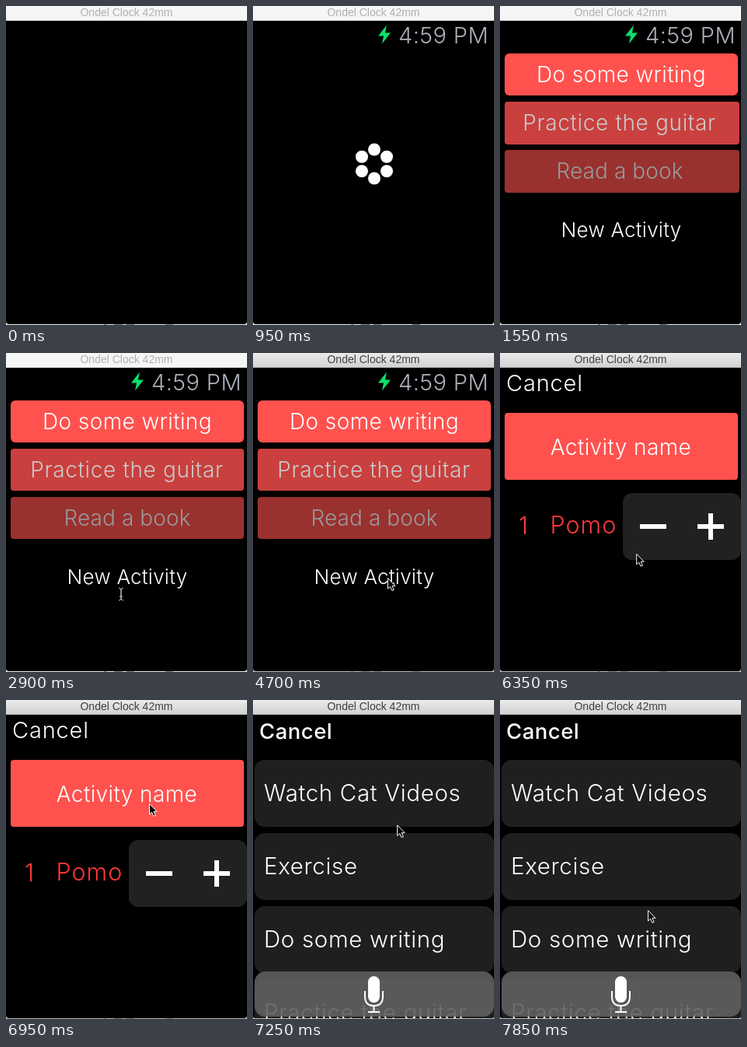
Write an HTML page that moves like this. It is 310 px wide and 410 px high and loops after 8 s.

```html
<!DOCTYPE html>
<html lang="en">
<head>
<meta charset="utf-8">
<title>Activity picker</title>
<style>
  html, body { margin: 0; width: 100%; height: 100%; overflow: hidden; background: #000; }
  svg { display: block; width: 310px; height: 410px; }
  text { font-family: Inter, Roboto, sans-serif; font-size: 28px; font-weight: 300; letter-spacing: .4px; fill: #fff; }
  .mid { text-anchor: middle; }
  .big { font-size: 29.5px; font-weight: 360; letter-spacing: .65px; }
  .red { font-size: 30.5px; letter-spacing: 1px; fill: #ff3838; }
  #title { font: 14px "Liberation Sans", Arial, sans-serif; letter-spacing: 0; }
</style>
</head>
<body>
<svg viewBox="0 0 310 410">
  <defs>
    <linearGradient id="bar" x2="0" y2="1">
      <stop stop-color="#ebebeb"/><stop offset="1" stop-color="#d0d0d0"/>
    </linearGradient>
    <clipPath id="screen"><path d="M0 19H310V405Q310 409 306 409H4Q0 409 0 405Z"/></clipPath>
  </defs>

  <rect id="edge" width="310" height="410"/>
  <path d="M126 409.5h3M139 409.5h11M155 409.5h10M205 409.5h10" stroke="#888"/>
  <path d="M0 19H310V405Q310 409 306 409H4Q0 409 0 405Z"/>

  <g clip-path="url(#screen)">
    <g id="home">
      <path d="M172 24.5L161 38.5H168L166 48.5L177 34.5H170Z" fill="#0be06a"/>
      <text x="303" y="48" text-anchor="end" style="font-size:29px;font-weight:350;fill:#adb1ba">4:59 PM</text>
      <g id="list">
        <rect x="6" y="61" width="300" height="54" rx="6" fill="#ff524f"/>
        <text class="mid" x="156" y="98">Do some writing</text>
        <g opacity=".79">
          <rect class="grow" x="6" y="123" width="300" height="54" rx="4" fill="#ff524f"/>
          <text class="mid shift" x="155.5" y="160" style="letter-spacing:.65px">Practice the guitar</text>
        </g>
        <g opacity=".6">
          <rect class="grow" x="6" y="185" width="300" height="54" rx="4" fill="#ff524f"/>
          <text class="mid shift" x="156" y="222" style="letter-spacing:.1px">Read a book</text>
        </g>
        <text id="add" class="mid" x="156" y="297" style="font-size:26px;letter-spacing:.25px">New Activity</text>
      </g>
    </g>

    <g id="modal">
      <text x="8" y="49" style="font-size:29px;letter-spacing:.8px">Cancel</text>
      <g id="form">
        <rect x="6" y="77" width="300" height="86" rx="4" fill="#ff524f"/>
        <text class="mid" x="155.5" y="131">Activity name</text>
        <text class="red" x="24" y="233">1</text>
        <text class="red" x="64.5" y="232">Pomo</text>
        <rect x="158" y="180" width="152" height="86" rx="12" fill="#212121"/>
        <path d="M180 223h34M254 223h34M271 206v34" stroke="#fff" stroke-width="6"/>
      </g>
    </g>

    <g id="spinner" fill="#fff"></g>

    <g id="picker">
      <rect y="19" width="310" height="391"/>
      <text x="8" y="50" style="font-size:27.5px;font-weight:500;letter-spacing:.5px">Cancel</text>
      <g id="options"></g>
      <rect x="2" y="349" width="308" height="58" rx="14" fill="#606060" opacity=".9"/>
      <rect x="148" y="355" width="15" height="34" rx="7.5" fill="#fff"/>
      <path d="M144 374V381Q144 393 155.5 393T167 381V374M155.5 393V401M148 401H163" fill="none" stroke="#fff" stroke-width="2"/>
    </g>
  </g>

  <rect id="head" width="310" height="19"/>
  <path id="rule" d="M0 18.5H310"/>
  <text id="title" class="mid" x="155" y="13">Ondel Clock 42mm</text>

  <path id="beam" d="M-3 -8Q0 -8 0 -5V5Q0 8 -3 8M3 -8Q0 -8 0 -5V5Q0 8 3 8M-2 3H2" fill="none" stroke="#bbb"/>
  <path id="arrow" d="M.5 .5V14L3.6 11.2L5.8 16.3L8.2 15.3L6 10.3H10Z" stroke="#fff"/>
</svg>
<script>
const $ = id => document.getElementById(id);
const show = (id, alpha) => $(id).setAttribute('opacity', +alpha);
const move = (el, x, y) => el.setAttribute('transform', `translate(${x} ${y})`);
const clamp = v => Math.max(0, Math.min(1, v));

// pointer track: time, x, y
const track = [
  [2300, 277, 225], [2750, 144, 323], [2900, 148, 310], [3050, 150, 300],
  [3350, 150, 290], [3650, 160, 284], [4250, 160, 284], [4700, 173, 289],
  [6200, 173, 289], [6950, 184, 133], [7100, 184, 133], [7850, 190, 270]
];

$('options').innerHTML = ['Watch Cat Videos', 'Exercise', 'Do some writing', 'Practice the guitar']
  .map((s, i) => `<rect x="2" y="${77 + 94 * i}" width="308" height="86" rx="13" fill="#1f1f1f"/>
    <text class="big" x="14" y="${130 + 94 * i}">${s}</text>`).join('');

$('spinner').innerHTML = '<circle r="8"/>'.repeat(6);
const dots = [...$('spinner').children];

function pointerAt(t) {
  const i = track.findIndex(p => p[0] > t);
  if (i < 0) return track.at(-1).slice(1);
  if (i === 0) return track[0].slice(1);
  const [t0, x0, y0] = track[i - 1], [t1, x1, y1] = track[i];
  const k = (t - t0) / (t1 - t0);
  return [x0 + (x1 - x0) * k, y0 + (y1 - y0) * k];
}

function spin(t) {
  const first = t < 1550;
  const cy = first ? 203 : 199;
  const turn = -95 + (Math.min(t, 5750) - 5600) / 6;
  dots.forEach((dot, i) => {
    const a = (turn + 60 * i) * Math.PI / 180;
    move(dot, 156 + 18.5 * Math.cos(a), cy + 18.5 * Math.sin(a));
  });
  show('spinner', first ? t >= 500 : t >= 5150 && t < 6200);
}

function draw(t) {
  const active = t >= 3350;
  $('edge').setAttribute('fill', active ? '#bbb' : '#eee');
  $('head').setAttribute('fill', active ? 'url(#bar)' : '#f6f6f6');
  $('rule').setAttribute('stroke', active ? '#b4b4b4' : '#e2e2e2');
  $('title').style.fill = active ? '#404040' : '#b0b0b0';

  show('home', t < 500 ? 0 : 1 - clamp((t - 4850) / 300));
  show('list', t >= 1550);
  show('add', t >= 4400 && t < 4700 ? .6 : 1);
  const settling = t < 1700;
  document.querySelectorAll('.grow').forEach(r => {
    r.setAttribute('width', settling ? 302 : 300);
    r.setAttribute('height', settling ? 55 : 54);
  });
  document.querySelectorAll('.shift').forEach(s => move(s, settling ? -2 : 0, 0));

  show('modal', clamp((t - 4850) / 300));
  const rise = 97 * (1 - clamp((t - 5000) / 300)) ** 2;
  move($('modal'), 0, rise);
  move($('spinner'), 0, t < 1550 ? 0 : rise);
  show('form', t >= 6200);
  show('picker', clamp((t - 6950) / 300));
  spin(t);

  const at = pointerAt(t);
  move($('beam'), ...at);
  move($('arrow'), ...at);
  show('beam', t >= 2300 && !active);
  show('arrow', active);
}

const step = 150, lead = 500;
function tick(now) {
  const t = now % 8000;
  draw(t < lead ? 0 : lead + Math.floor((t - lead) / step) * step);
  requestAnimationFrame(tick);
}
tick(performance.now());
</script>
</body>
</html>
```
